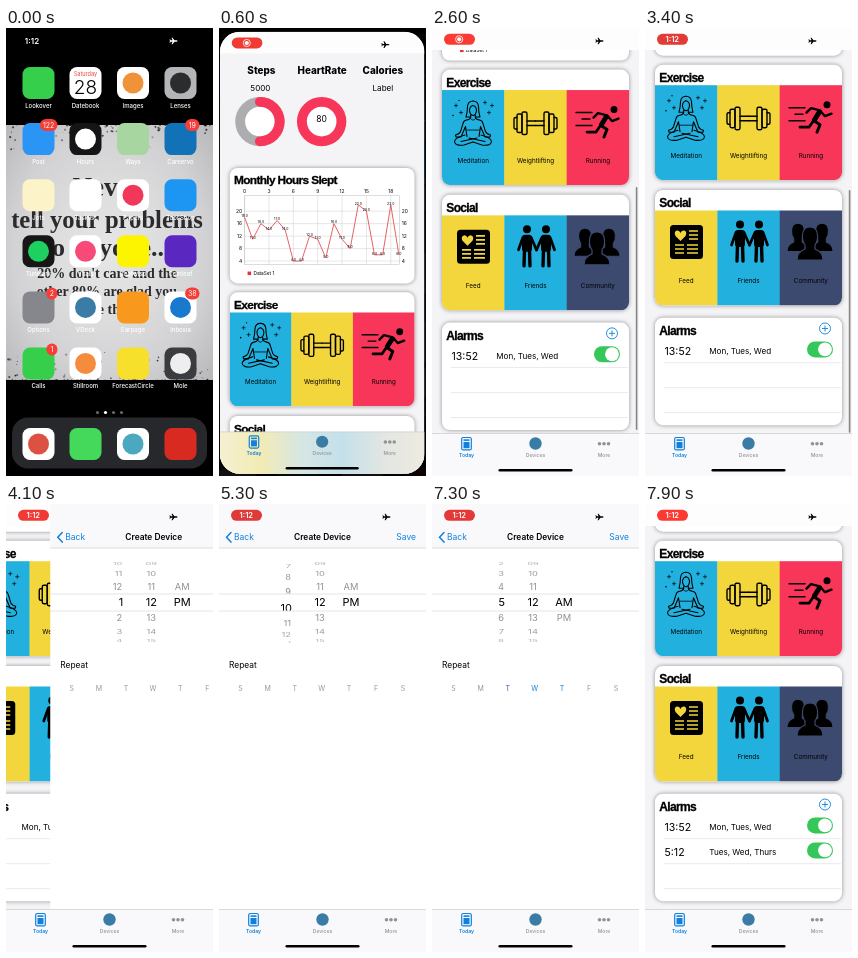
Recreate the animation shown at these times as an HTML page. Size 207 by 448 pixels, loop 8000 ms.

```html
<!DOCTYPE html>
<html lang="en">
<head>
<meta charset="utf-8">
<title>Wellness app demo</title>
<style>
  html, body { margin: 0; width: 100%; height: 100%; overflow: hidden; background: #000; }
  svg { display: block; width: 100vw; height: 100vh; }
  text { font-family: Inter, Roboto, sans-serif; }
  .heavy { font-family: "Liberation Sans", Arial, sans-serif; font-weight: 700; letter-spacing: -.65px; stroke: #000; stroke-width: .3px; }
  .quote { font-family: "Liberation Serif", "Noto Serif", serif; font-weight: 700; }
  .card { filter: drop-shadow(0 .3px 2px rgba(0, 0, 0, .42)); }
  .ink { fill: none; stroke: #000; stroke-linecap: round; stroke-linejoin: round; }
</style>
</head>
<body>
<svg id="stage" viewBox="0 0 207 448" preserveAspectRatio="none"></svg>
<script>
const LOOP = 8000;
const BLUE = '#0f80dc', PINK = '#f7365a', YELLOW = '#f3d63c', CYAN = '#22b1de', NAVY = '#3c4a70';
const stage = document.getElementById('stage');

// ---- markup helpers ----
const text = (x, y, s, size, attrs = '', anchor = 'middle') =>
  `<text x="${x}" y="${y + size * .36}" font-size="${size}" text-anchor="${anchor}" ${attrs}>${s}</text>`;
const rect = (x, y, w, h, fill, r = 0, attrs = '') =>
  `<rect x="${x}" y="${y}" width="${w}" height="${h}" rx="${r}" fill="${fill}" ${attrs}/>`;
const dot = (x, y, r, fill, attrs = '') => `<circle cx="${x}" cy="${y}" r="${r}" fill="${fill}" ${attrs}/>`;
const line = (x1, y1, x2, y2, color, w = .6) =>
  `<path d="M${x1} ${y1}L${x2} ${y2}" stroke="${color}" stroke-width="${w}"/>`;
const ink = (d, w = 1.1) => `<path class="ink" stroke-width="${w}" d="${d}"/>`;
const mirror = (s, axis) => s + `<g transform="matrix(-1 0 0 1 ${2 * axis} 0)">${s}</g>`;
const plane = (x, y, fill) =>
  `<path transform="translate(${x} ${y})" fill="${fill}" d="M4 0Q4 -.7 3 -.7L1 -.7L-1 -3.3L-1.9 -3.3L-1 -.7L-2.7 -.7L-3.4 -1.7L-4 -1.7L-3.6 0L-4 1.7L-3.4 1.7L-2.7 .7L-1 .7L-1.9 3.3L-1 3.3L1 .7L3 .7Q4 .7 4 0Z"/>`;

// ---- home screen ----
const COLS = [32.5, 79.5, 127, 174.5];
// label, tile colour, inner shape colour, badge
const APPS = [
  ['Lookover', '#35cf4b'], ['Datebook', '#fff'], ['Images', '#fff', '#f0923a'], ['Lenses', '#b4b5b8', '#2b2c2e'],
  ['Post', '#2a95f5', , 122], ['Hours', '#151515', '#fff'], ['Ways', '#a8d6a0'], ['Careervo', '#1272b8', , 19],
  ['Jots', '#fdf3c8'], ['Tasklist', '#fff'], ['Papers', '#fff', '#f2385a'], ['Tool Shop', '#1d95f2'],
  ['Tunelark', '#161616', '#1ed05f'], ['Vitals', '#fff', '#f84a78'], ['Chatwisp', '#fdf400'], ['Coinleaf', '#5a28c0'],
  ['Options', '#85878c', , 2], ['VDeck', '#fff', '#3a7ca5'], ['Earpage', '#f8991d'], ['Inboxia', '#fff', '#1979cf', 38],
  ['Calls', '#35cf4b', , 1], ['Stillroom', '#fff', '#f58b3c'], ['ForecastCircle', '#f6e02c'], ['Mole', '#3a3c40', '#eee'],
];
const DOCK = [['#fff', '#dd5144'], ['#45d95c'], ['#fff', '#4aa9c0'], ['#d92a22']];

function tile(cx, cy, fill, inner) {
  return rect(cx - 16, cy - 16, 32, 32, fill, 7.5) + (inner ? dot(cx, cy, 10.5, inner) : '');
}
function app([name, fill, inner, badge], i) {
  const cx = COLS[i % 4], cy = 55 + Math.floor(i / 4) * 56.1;
  let s = tile(cx, cy, fill, inner) + text(cx, cy + 22.5, name, 6, 'fill="#fff" font-weight="500"');
  if (i === 1) s += text(cx, cy - 9, 'Saturday', 5.6, 'fill="#f0443c"') + text(cx, cy + 4, '28', 19, 'font-weight="300"');
  if (badge) {
    const w = 8 + String(badge).length * 3.2;
    s += rect(cx + 19 - w, cy - 20, w, 12, '#f63d38', 6) + text(cx + 19 - w / 2, cy - 14, badge, 7, 'fill="#fff"');
  }
  return s;
}
function specks() {
  let seed = 7, s = '';
  const rnd = () => (seed = seed * 16807 % 2147483647) / 2147483647;
  for (let i = 0; i < 260; i++) {
    const d = 30 * rnd() ** 5, y = i % 2 ? 97 + d : 352 - d;
    s += dot(rnd() * 207, y, .3 + rnd() * .9, '#111', `opacity="${.3 + rnd() * .6}"`);
  }
  return s;
}
const QUOTE = [['Never', 158, 27], ['tell your problems', 191, 24.6], ['to anyone...', 219, 26],
  ["20% don't care and the", 244.5, 14], ['other 80% are glad you', 263, 14], ['have them', 281, 14]];
const home = `<g id="home">${rect(-60, -60, 330, 570, '#000')}
  ${rect(0, 97, 207, 255, 'url(#paper)')}<g clip-path="url(#paperClip)">${specks()}</g>
  ${QUOTE.map(([s, y, z]) => text(101, y, s, z, 'class="quote" fill="#2b2b2d"')).join('')}
  ${APPS.map(app).join('')}
  ${[0, 1, 2, 3].map(i => dot(91.5 + i * 8, 384.5, 1.6, i === 1 ? '#fff' : '#666')).join('')}
  ${rect(6, 389.5, 195, 51, '#27282b', 16)}
  ${DOCK.map(([f, c], i) => tile(COLS[i], 416, f, c)).join('')}
  ${text(26, 13, '1:12', 8, 'fill="#fff" font-weight="600"')}${plane(167.5, 13, '#fff')}</g>`;

// ---- pictograms, in card coordinates ----
const spark = (x, y) => ink(`M${x - 1.6} ${y}h3.2M${x} ${y - 1.6}v3.2`, .7);
const meditation = mirror(
  ink('M41 31.5Q36 31.5 35.5 37Q35.5 42 34 47.5H38M41 36Q37.5 37 37.5 41Q38 45.5 41 46') +
  ink('M38.7 45.5V48Q38 50 34.5 50.5Q31.5 51 31 54L28.5 62Q27 65 23.5 65.5L24 67.5H29L33.5 57L35 67') +
  ink('M33 65.5Q23 68 22.5 72Q23 76.5 32 75.5L41 72.5M29 72L45 68.5'), 41) +
  ink('M38 48.5Q41 53 44 48.5M35 60.5H47', .8) +
  spark(24, 36) + spark(29, 43) + spark(53, 33) + spark(60, 36) + spark(57, 43) + dot(21, 46, .8, '#000') + dot(27, 31, .7, '#000');
const dumbbell = mirror(
  ink('M95 51.5H103.5M95 56H103.5', 1.4) + ink('M85 48h-1.5q-1.5 0 -1.5 1.5v8.5q0 1.5 1.5 1.5h1.5', 1.4) +
  rect(85, 44.5, 5, 18.5, 'none', 1.6, 'stroke="#000" stroke-width="1.4"') +
  rect(90, 42.5, 5, 22.5, 'none', 1.6, 'stroke="#000" stroke-width="1.4"'), 103.5);
const runner = dot(182, 40, 3.5, '#000') + ink('M174.5 47L169.5 55', 5) + ink('M174 45.5L166 43.5L161.5 48', 2.4) +
  ink('M176 47L180 51.5L186.5 49', 2.4) + ink('M169 56L175 60L172 67.5', 3) + ink('M168.5 56L164 62.5L155 62.5', 2.8) +
  ink('M144 43H160M150 49.5H158M144 56H160', 1.4);
const feed = rect(25, 35, 33, 34, '#000', 3.5) +
  `<path fill="${YELLOW}" d="M35.5 51L30.5 46Q28.5 42 31.8 40.6Q34.5 40 35.5 43Q36.5 40 39.2 40.6Q42.5 42 40.5 46Z"/>` +
  [41, 45, 49].map(y => line(44, y, 53, y, YELLOW, 1.7)).join('') +
  [55, 59, 63].map(y => line(30, y, 39, y, YELLOW, 1.7) + line(42, y, 53, y, YELLOW, 1.7)).join('');
const friends = mirror(dot(95, 34.5, 4, '#000') + rect(90, 40, 10, 17, '#000', 3) +
  ink('M91 42.5L86.5 55', 2.8) + ink('M99 42.5L104.5 55', 2.8) + ink('M92.5 55L92 71M97.5 55L98 71', 3.4), 104.5);
const person = (x, y, k, edge) => `<g transform="translate(${x} ${y}) scale(${k})" stroke="${edge}" stroke-width="1.2">
  <path d="M-13 24Q-13 16 -5 13L-5 9Q-8 5 -7.5 -1Q-7 -9 0 -9Q7 -9 7.5 -1Q8 5 5 9L5 13Q13 16 13 24Z"/></g>`;
const community = person(153, 41, .85, NAVY) + person(177, 41, .85, NAVY) + person(165, 46, 1, NAVY);

// ---- scrolling list ----
const card = (y, h, body) => `<g transform="translate(0 ${y})">
  <g class="card">${rect(10, 0, 187, h, '#fff', 8)}</g>${body}</g>`;
function panels(y, title, items) {
  const body = items.map(([name, fill, art], i) => {
    const x = 10 + i * 62.33;
    return rect(x, 20.5, 62.6, 95, fill) + art + text(x + 31.2, 90.8, name, 6.3);
  }).join('');
  return card(y, 115.5, `<g clip-path="url(#cardClip)">${body}</g>` + text(14.3, 12.7, title, 12, 'class="heavy"', 'start'));
}
const HOURS = [18, 11, 16, 14, 17, 14, 4, 4, 12, 11, 5, 16, 11, 8, 22, 20, 6, 6, 22, 6];
function chart() {
  const px = i => 25 + i * 8.22, py = v => 107 - v * 3.16;
  let s = text(14.3, 12, 'Monthly Hours Slept', 12, 'class="heavy"', 'start');
  for (let i = 0; i < 20; i += 3) s += line(px(i), 28, px(i), 98, '#ccc', .5) + text(px(i), 24, i, 5);
  for (let v = 4; v <= 20; v += 4)
    s += line(25, py(v), 182, py(v), '#ccc', .5) + text(22.5, py(v), v, 5, '', 'end') + text(184, py(v), v, 5, '', 'start');
  s += rect(25, 28, 157, 70, 'none', 0, 'stroke="#bbb" stroke-width=".5"');
  s += `<polyline fill="none" stroke="#e2383c" stroke-width=".8" points="${HOURS.map((v, i) => px(i) + ',' + py(v)).join(' ')}"/>`;
  s += HOURS.map((v, i) => text(px(i), py(v) - 1.5, v + '.0', 3.5)).join('');
  return card(138, 117, s + rect(28, 105, 3.6, 3.6, '#e2383c') + text(34, 107, 'DataSet 1', 4.8, '', 'start'));
}
const ring = (x, back) => `<circle cx="${x}" cy="91" r="20" fill="#fff" stroke="${back}" stroke-width="10"/>`;
const toggle = y => rect(162, y - 8, 26, 16, '#35c759', 8) + dot(180, y, 6.9, '#fff');
const alarm = (y, time, days) => text(19.5, y, time, 10.6, '', 'start') + text(64.3, y, days, 8.1, '', 'start') + toggle(y - 1.7);
const alarms = card(517, 107.5,
  text(14.3, 13, 'Alarms', 12, 'class="heavy"', 'start') +
  `<g fill="none" stroke="${BLUE}" stroke-width=".9"><circle cx="180" cy="10.8" r="5.5"/><path d="M177 10.8h6M180 7.8v6"/></g>` +
  [45, 70, 95].map(y => line(19, y, 196, y, '#dcdcdf')).join('') +
  alarm(33.4, '13:52', 'Mon, Tues, Wed') + `<g id="newAlarm">${alarm(58.4, '5:12', 'Tues, Wed, Thurs')}</g>`);
const headings = [['Steps', 42], ['HeartRate', 103.5], ['Calories', 165]]
  .map(([s, x]) => text(x, 38.7, s, 10, 'font-weight="800"')).join('');
const list = `<g id="list">${rect(0, 0, 207, 448, '#f4f3f6')}${rect(0, 0, 207, 22, '#fdfdfe')}
  <g clip-path="url(#scrollClip)"><g id="scroller">${headings}
    ${text(41, 57.3, '5000', 8.2)}${text(165, 57.3, 'Label', 8.2)}
    ${ring(40.5, '#adadaf')}<path d="M40.5 71A20 20 0 0 1 40.5 111" fill="none" stroke="${PINK}" stroke-width="10" stroke-linecap="round"/>
    ${ring(103, PINK)}${text(103, 88.5, '80', 8.6)}
    ${chart()}
    ${panels(264, 'Exercise', [['Meditation', CYAN, meditation], ['Weightlifting', YELLOW, dumbbell], ['Running', PINK, runner]])}
    ${panels(389.3, 'Social', [['Feed', YELLOW, feed], ['Friends', CYAN, friends], ['Community', NAVY, community]])}
    ${alarms}</g></g>
  ${rect(203.8, 0, 1.6, 243, '#555', .8, 'id="bar"')}</g>`;

// ---- alarm editor ----
const DAYS = [...'SMTWTFS'];
const editor = `<g id="editor">${rect(0, 0, 207, 448, '#fff')}${rect(0, 0, 207, 44, '#f9f9fc')}
  ${line(0, 44, 207, 44, '#c8c8cc')}
  <path d="M12 28.5L7.5 33.3L12 38.1" fill="none" stroke="${BLUE}" stroke-width="1.5" stroke-linecap="round"/>
  ${text(15, 33.3, 'Back', 8.5, `fill="${BLUE}"`, 'start')}
  ${text(103.5, 33.3, 'Create Device', 8.4, 'font-weight="600"')}
  ${text(197, 33.3, 'Save', 8.5, `fill="${BLUE}"`, 'end')}
  <g id="outer" clip-path="url(#outerClip)" fill="#8c8c90"></g>
  <g id="inner" clip-path="url(#bandClip)"></g>
  ${line(0, 90, 207, 90, '#d4d4d8')}${line(0, 107, 207, 107, '#d4d4d8')}
  ${text(10, 161.3, 'Repeat', 8.4, '', 'start')}
  ${DAYS.map((d, i) => text(21.5 + i * 27.1, 184.3, d, 7, `class="day" fill="#98989c"`)).join('')}</g>`;

const tabBar = `${rect(0, 405.5, 207, 43, '#f9f9fb')}${rect(0, 405.5, 207, 43, 'url(#glow)', 0, 'id="tint"')}
  ${line(0, 405.5, 207, 405.5, '#c4c4c8')}
  ${rect(29.7, 409.5, 9.6, 12.4, 'none', 1.5, `stroke="${BLUE}" stroke-width="1.2"`)}
  ${rect(31.5, 411.3, 6, 1.6, BLUE)}${rect(31.5, 414, 6, 6.2, BLUE)}
  ${dot(103.5, 415.5, 6.2, '#3a7ca5')}
  ${[167.5, 172, 176.5].map(x => dot(x, 415.7, 1.8, '#929296')).join('')}
  ${text(34.5, 427, 'Today', 5.1, `fill="${BLUE}" font-weight="600"`)}
  ${text(103.5, 427, 'Devices', 5.1, 'fill="#929296" font-weight="500"')}
  ${text(172, 427, 'More', 5.1, 'fill="#929296" font-weight="500"')}
  ${rect(66.5, 441, 74, 2.6, '#000', 1.3)}`;
const status = `${rect(12, 5.8, 31, 11, '#fa3a31', 5.5, 'id="pill"')}
  <g id="rec">${dot(27.2, 11.3, 3.6, 'none', 'stroke="#fff" stroke-width=".8"')}${dot(27.2, 11.3, 2.1, '#fff')}</g>
  ${text(27.3, 11.3, '1:12', 7.6, 'id="time" fill="#fff" font-weight="600"')}${plane(167.5, 13, '#000')}`;

const clip = (id, x, y, w, h, r = 0) => `<clipPath id="${id}">${rect(x, y, w, h, '#000', r)}</clipPath>`;
const stops = colors => colors.map((c, i) => `<stop offset="${i / (colors.length - 1)}" stop-color="${c}"/>`).join('');
stage.innerHTML = `<defs>
  <radialGradient id="paper" r=".7">${stops(['#e6e6e7', '#dededf', '#d2d2d4', '#b8b8ba'])}</radialGradient>
  <linearGradient id="glow">${stops(['#f4f0d2', '#f3ebb4', '#d6e6e4', '#c4e0ea', '#e2e6e2', '#eeeae0'])}</linearGradient>
  ${clip('cardClip', 10, 0, 187, 115.5, 8)}${clip('scrollClip', 0, 22, 207, 384)}${clip('bandClip', 0, 90.3, 207, 16.4)}
  ${clip('paperClip', 0, 97, 207, 255)}
  <clipPath id="outerClip">${rect(0, 50, 207, 40, '#000')}${rect(0, 107, 207, 40, '#000')}</clipPath>
  <clipPath id="windowClip"><rect id="frame" width="207" height="448"/></clipPath></defs>
  ${home}<g id="window"><g clip-path="url(#windowClip)">${list}${editor}${tabBar}${status}</g></g>`;

// ---- picker wheels ----
const $ = id => document.getElementById(id);
const MID = 98.5, RADIUS = 41.5, STEP = .393;
function wheel(x, anchor, label) {
  const make = (host, size) => Array.from({ length: 9 }, () => {
    host.insertAdjacentHTML('beforeend', text(0, 0, '', size, '', anchor));
    return host.lastElementChild;
  });
  const grey = make($('outer'), 9.3), dark = make($('inner'), 11);
  return pos => {
    const put = (el, v, zoom) => {
      const a = (v - pos) * STEP, s = Math.abs(a) < 1.4 ? label(v) : '';
      if (el.textContent !== s) el.textContent = s;
      el.setAttribute('transform',
        `translate(${x + (anchor === 'end' ? zoom - 1 : 0) * 8} ${MID + zoom * RADIUS * Math.sin(a)}) scale(1 ${Math.max(.01, Math.cos(a))})`);
      el.setAttribute('opacity', zoom > 1 ? 1 : .45 + .55 * Math.max(0, Math.cos(a)));
    };
    for (let i = 0; i < 9; i++) {
      const v = Math.round(pos) + i - 4;
      put(grey[i], v, 1);
      put(dark[i], v, 1.12);
    }
  };
}
const mod = (a, n) => (a % n + n) % n;
const hourWheel = wheel(72, 'end', v => String(mod(v - 1, 12) + 1));
const minuteWheel = wheel(101, 'middle', v => String(mod(v, 60)).padStart(2, '0'));
const halfWheel = wheel(132, 'middle', v => ['AM', 'PM'][v] || '');

// ---- timing ----
const span = (t, a, b) => Math.min(1, Math.max(0, (t - a) / (b - a)));
const out = (u, n = 3) => 1 - (1 - u) ** n;
const smooth = u => u * u * (3 - 2 * u);
function track(keys, t) {
  const i = keys.findIndex(k => k[0] > t);
  if (i < 0) return keys[keys.length - 1][1];
  if (i === 0) return keys[0][1];
  const [a, x] = keys[i - 1], [b, y] = keys[i];
  return x + (y - x) * (t - a) / (b - a);
}
const HOUR_KEYS = [[4650, 13], [4850, 12.1], [5080, 10.6], [5300, 9.69], [5600, 7.4], [5850, 5.8], [6050, 5.2], [6250, 5]];
const DAY_TAPS = { 2: [6500, '#3d57b5'], 3: [6780, BLUE], 4: [7060, BLUE] };
const days = document.querySelectorAll('.day');
const move = (id, x, y = 0) => $(id).setAttribute('transform', `translate(${x} ${y})`);
const show = (id, o) => $(id).setAttribute('opacity', o);

function draw(t) {
  const p = out(span(t, 150, 840), 4), q = 1 - p;
  const kx = (32 + 175 * p) / 207, ky = (32 + 416 * p) / 448;
  $('window').setAttribute('transform', `translate(${63.5 * q} ${264 * q}) scale(${kx} ${ky})`);
  $('frame').setAttribute('rx', p < 1 ? Math.min(50, 20 / kx) : 0);
  show('window', span(t, 150, 260));
  const z = 1 + .35 * p;
  $('home').setAttribute('transform', `translate(${79.5 * (1 - z)} ${280 * (1 - z)}) scale(${z})`);
  show('home', 1 - .95 * p);
  show('tint', 1 - span(t, 620, 900));

  const scroll = 227.3 * out(span(t, 1900, 2870));
  const push = out(span(t, 3900, 4400)) - smooth(span(t, 7400, 7850));
  move('scroller', 0, -scroll);
  move('bar', 0, 25.5 + scroll * .6);
  show('bar', .7 * span(t, 1900, 2000) * (1 - span(t, 3400, 3650)));
  move('list', -62 * push);
  move('editor', 207 * (1 - push));
  show('newAlarm', t >= 7400 ? 1 : 0);

  hourWheel(track(HOUR_KEYS, t));
  minuteWheel(12);
  halfWheel(1 - smooth(span(t, 6150, 6450)));
  for (const i in DAY_TAPS) days[i].setAttribute('fill', t >= DAY_TAPS[i][0] ? DAY_TAPS[i][1] : '#98989c');

  show('rec', t < 3000 ? 1 : 0);
  show('time', t < 3000 ? 0 : 1);
  const pulse = .5 + .5 * Math.cos((t - 7900) / 1730 * 2 * Math.PI);
  $('pill').setAttribute('fill', `rgb(${222 + 30 * pulse} 58 ${56 - 6 * pulse})`);
}

const start = performance.now();
function tick() {
  draw((performance.now() - start) % LOOP);
  requestAnimationFrame(tick);
}
tick();
</script>
</body>
</html>
```
